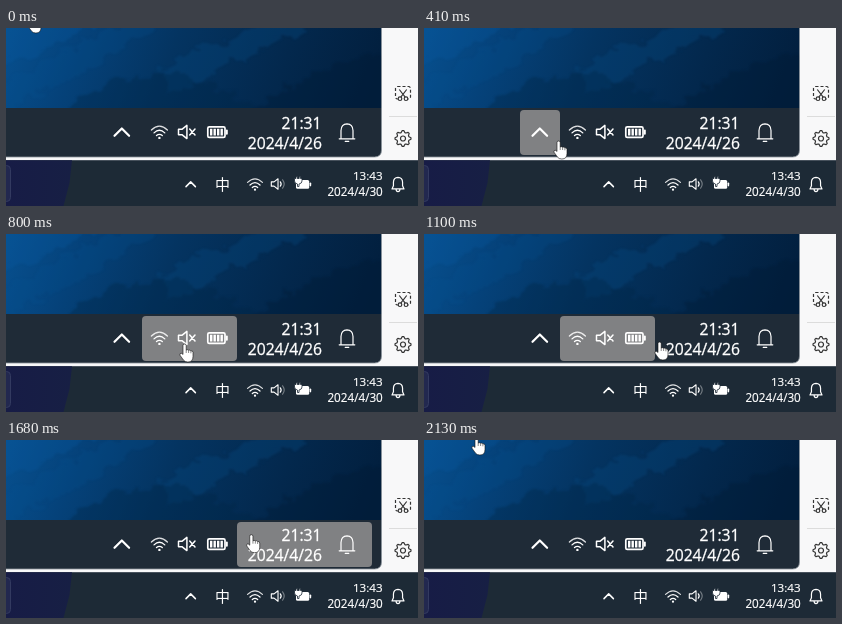
An HTML page that plays this animation: 412x178 px, repeating every 2360 ms.

```html
<!DOCTYPE html>
<html lang="en">
<head>
<meta charset="utf-8">
<title>Taskbar hover</title>
<style>
  html, body { margin: 0; width: 100%; height: 100%; overflow: hidden; background: #1d2a36; }
  svg { display: block; width: 100%; height: 100%; }
  text { font-family: "Open Sans", "Noto Sans", sans-serif; fill: #fff; text-anchor: end; }
  .clock { stroke: #fff; stroke-width: .3; }
  .line { fill: none; stroke: #fff; stroke-linecap: round; stroke-linejoin: round; }
  .dark { fill: none; stroke: #333; stroke-width: 1.2; stroke-linejoin: round; }
</style>
</head>
<body>
<svg viewBox="0 0 412 178">
  <defs>
    <linearGradient id="sky" gradientUnits="userSpaceOnUse" x1="0" y1="0" x2="340" y2="130">
      <stop offset="0" stop-color="#07508f"/>
      <stop offset=".2" stop-color="#05427a"/>
      <stop offset=".45" stop-color="#043461"/>
      <stop offset=".75" stop-color="#03284d"/>
      <stop offset="1" stop-color="#021f3e"/>
    </linearGradient>
    <linearGradient id="dusk" x2="1">
      <stop offset="0" stop-color="#171c46"/>
      <stop offset="1" stop-color="#171f44"/>
    </linearGradient>
    <filter id="cloud" x="-20%" y="-20%" width="140%" height="140%" color-interpolation-filters="sRGB">
      <feTurbulence type="fractalNoise" baseFrequency=".06 .09" numOctaves="3" seed="4"/>
      <feDisplacementMap in="SourceGraphic" scale="22" xChannelSelector="R" yChannelSelector="G"/>
      <feGaussianBlur stdDeviation="1.200"/>
    </filter>
    <clipPath id="screen"><path d="M0 0H375.500V122Q375.500 129 368.500 129H0Z"/></clipPath>
    <clipPath id="view"><path d="M0 0H376V80H0Z"/></clipPath>
    <g id="wifi" class="line" stroke-width="1.300">
      <path d="M-8-2.300Q0-10 8-2.300" opacity=".85"/>
      <path d="M-5.400 .6Q0-4.600 5.400 .6M-2.900 3.300Q0 .8 2.900 3.300"/>
      <circle cy="5.600" r="1.200" fill="#fff" stroke="none"/>
    </g>
    <path id="speaker" class="line" d="M-8-2.700H-4.600L.4-6.600V6.600L-4.600 2.700H-8Z"/>
    <path id="bell" class="line" d="M-7.500 5.500L-5.700 1.700V-3Q-5.500-8.700 0-8.900 5.500-8.700 5.700-3V1.700L7.500 5.500ZM-2.500 5.800Q-2.200 8.900 0 8.900T2.500 5.800"/>
  </defs>

  <rect width="412" height="133" fill="#f8f8f9"/>

  <g clip-path="url(#screen)">
    <rect width="376" height="80" fill="url(#sky)"/>
    <g clip-path="url(#view)">
      <g filter="url(#cloud)">
        <path d="M-20-20H110Q60 20-20 40Z" fill="#0a5ba3" opacity=".28"/>
        <path d="M-20 66Q50 24 130-10H160Q90 44-20 90Z" fill="#075293" opacity=".22"/>
        <path d="M150 44Q200 14 290-12H320Q250 26 160 66Z" fill="#07497f" opacity=".35"/>
        <path d="M40 100Q90 48 150 46T270 100Z" fill="#022546" opacity=".35"/>
        <path d="M230 100Q290 36 400 20V100Z" fill="#021a34" opacity=".35"/>
      </g>
    </g>
    <rect y="80" width="376" height="49" fill="#1f2b37"/>
    <rect id="glow" y="82" height="45" rx="4" fill="#808183"/>

    <path class="line" stroke-width="2.200" d="M108.500 107.800L115.800 100.500 123.100 107.800"/>
    <use href="#wifi" x="153.400" y="104.300"/>
    <use href="#speaker" x="180.500" y="104" stroke-width="1.500"/>
    <path class="line" stroke-width="1.500" d="M183.700 101L189 107M189 101L183.700 107"/>
    <rect class="line" x="201.800" y="98.800" width="17.200" height="10.600" rx="1.500" stroke-width="1.700"/>
    <path class="line" stroke-width="2" d="M220.800 102.500V105.700"/>
    <path stroke="#fff" stroke-width="2.400" d="M205.200 100.800V107.400M208.700 100.800V107.400M212.200 100.800V107.400M215.700 100.800V107.400"/>
    <text class="clock" x="315.500" y="101" font-size="15.700">21:31</text>
    <text class="clock" x="316" y="121" font-size="15.700">2024/4/26</text>
    <path class="line" stroke-width="1.200" d="M333.200 110.800H348.800M335 110.500V102.500Q335.200 96 341 95.800 346.800 96 347 102.500V110.500M339.200 113.300H342.800"/>
  </g>
  <path d="M375.500 0V122Q375.500 129 368.500 129H0" fill="none" stroke="#8b939b" stroke-width=".8"/>

  <path d="M383 88.500H411" stroke="#dcdcdc"/>
  <rect class="dark" x="389.500" y="58.500" width="15" height="12.500" rx="2" stroke-dasharray="3 2"/>
  <g class="dark">
    <path fill="#f8f8f9" stroke="none" d="M392 62H402V73H392Z"/>
    <path d="M393.300 61.500L399.200 69.200M400.700 61.500L394.800 69.200"/>
    <circle cx="394" cy="70.700" r="1.800"/>
    <circle cx="400" cy="70.700" r="1.800"/>
  </g>
  <g transform="translate(397 110.500)">
    <path id="gear" class="dark"/>
    <circle class="dark" r="2.500"/>
  </g>

  <rect y="132.200" width="412" height="46" fill="#1d2a36"/>
  <path d="M0 132.200H66L63.500 155 57.500 178H0Z" fill="url(#dusk)"/>
  <rect x="-20" y="137.500" width="24.500" height="36" rx="4" fill="#22284f" stroke="#333a60"/>
  <path class="line" stroke-width="1.500" d="M180 158.600L184.700 153.900 189.400 158.600"/>
  <text x="216.500" y="161.500" font-size="15" style="font-family:'Noto Sans CJK SC','Noto Sans CJK',sans-serif;text-anchor:middle">中</text>
  <use href="#wifi" transform="translate(249 156.500) scale(.93)"/>
  <use href="#speaker" transform="translate(271.700 156) scale(.8)" stroke-width="1.400"/>
  <path class="line" stroke-width="1.200" d="M274.300 153.800Q276 156 274.300 158.200"/>
  <path class="line" stroke-width="1.100" opacity=".4" d="M276.600 151.800Q279.800 156 276.600 160.200"/>
  <rect x="290" y="152" width="13.200" height="8.800" rx="1.500" fill="#fff"/>
  <path class="line" stroke-width="1.600" d="M304.400 155.200V157.600"/>
  <path d="M288.500 150.500H290V148.500H291.300V150.500H293.200V148.500H294.500V150.500H296V153Q296 155.500 293 156V158.500H291.500V156Q288.500 155.500 288.500 153Z" fill="#fff" stroke="#1d2a36" stroke-width=".8"/>
  <g class="clock" style="stroke-width:.2">
    <text x="376.600" y="152.300" font-size="11.600">13:43</text>
    <text x="376.800" y="167.500" font-size="11.700">2024/4/30</text>
  </g>
  <use href="#bell" transform="translate(392 156.500) scale(.8)" stroke-width="1.500"/>

  <g id="cursor" stroke="#111" stroke-width=".6" stroke-linejoin="round" fill="#fff">
    <g id="hand">
      <path d="M-2 1.500Q-2 0-.4 0T1.200 1.500V6Q2.700 5.300 3.600 6.300 5.100 5.700 5.900 6.800 7.800 6.500 8 8.300V12.500Q8 18 2.800 18-.2 18-1.600 16L-5 11.200Q-5.500 9.400-4 9.200-3 9.200-2 10.500Z"/>
      <path d="M1.200 6V9M3.600 6.500V9M5.900 7V9.300" stroke-width=".5"/>
    </g>
    <path id="pointer" d="M0 0V12.300L2.900 9.600 4.900 14.200 7 13.300 5.100 8.900H9Z"/>
  </g>
</svg>
<script>
  const LOOP = 2360;
  const el = id => document.getElementById(id);
  const glow = el('glow'), cursor = el('cursor'), hand = el('hand'), pointer = el('pointer');

  const ticks = [0, 30, 80, 130, 180, 220, 270, 320, 370, 410, 710,
    800, 850, 900, 950, 1000, 1050, 1100, 1150, 1200, 1260,
    1680, 1730, 1780, 1820, 1870, 1890, 1950, 2010, 2070, 2130];

  const linear = p => p;
  const smooth = p => p * p * (3 - 2 * p);
  const easeOut = p => 1 - (1 - p) ** 2;

  // Cursor path: time, x, y and the easing that leads there.
  const path = [
    [0, 27, -13, linear],
    [410, 135, 113, smooth],
    [650, 135, 113, linear],
    [800, 179, 110, linear],
    [1100, 236, 108, linear],
    [1260, 272, 110, linear],
    [1640, 272, 110, linear],
    [1870, 121, 22, linear],
    [2130, 53, -3, easeOut]
  ];

  // Left and right edges of the hover areas.
  const areas = [[96, 136], [136, 231], [231, 366]];

  function position(t) {
    const i = path.findIndex(k => k[0] >= t);
    if (i < 1) return path[0].slice(1, 3);
    const a = path[i - 1], b = path[i];
    const p = b[3]((t - a[0]) / (b[0] - a[0]));
    return [a[1] + (b[1] - a[1]) * p, a[2] + (b[2] - a[2]) * p];
  }

  function draw(t) {
    const i = ticks.findLastIndex(tick => tick <= t);
    const [x, y] = position(ticks[i]);
    cursor.setAttribute('transform', `translate(${x} ${y})`);

    // Hover feedback lags one refresh behind the cursor.
    const [hx, hy] = position(ticks[(i || ticks.length) - 1]);
    const area = hy > 82 && areas.find(([l, r]) => hx >= l && hx < r);
    glow.style.display = area ? '' : 'none';
    if (area) {
      glow.setAttribute('x', area[0]);
      glow.setAttribute('width', area[1] - area[0]);
    }
    const isHand = hy > 80 || hy < 2;
    hand.style.display = isHand ? '' : 'none';
    pointer.style.display = isHand ? 'none' : '';
  }

  function gearPath() {
    const points = [];
    for (let i = 0; i < 32; i++) {
      const a = (i - .5) * Math.PI / 16;
      const r = i % 4 < 2 ? 8 : 6.2;
      points.push(`${(r * Math.cos(a)).toFixed(2)} ${(r * Math.sin(a)).toFixed(2)}`);
    }
    return `M${points.join('L')}Z`;
  }

  el('gear').setAttribute('d', gearPath());
  const start = performance.now();
  function loop() {
    draw((performance.now() - start) % LOOP);
    requestAnimationFrame(loop);
  }
  loop();
</script>
</body>
</html>
```
